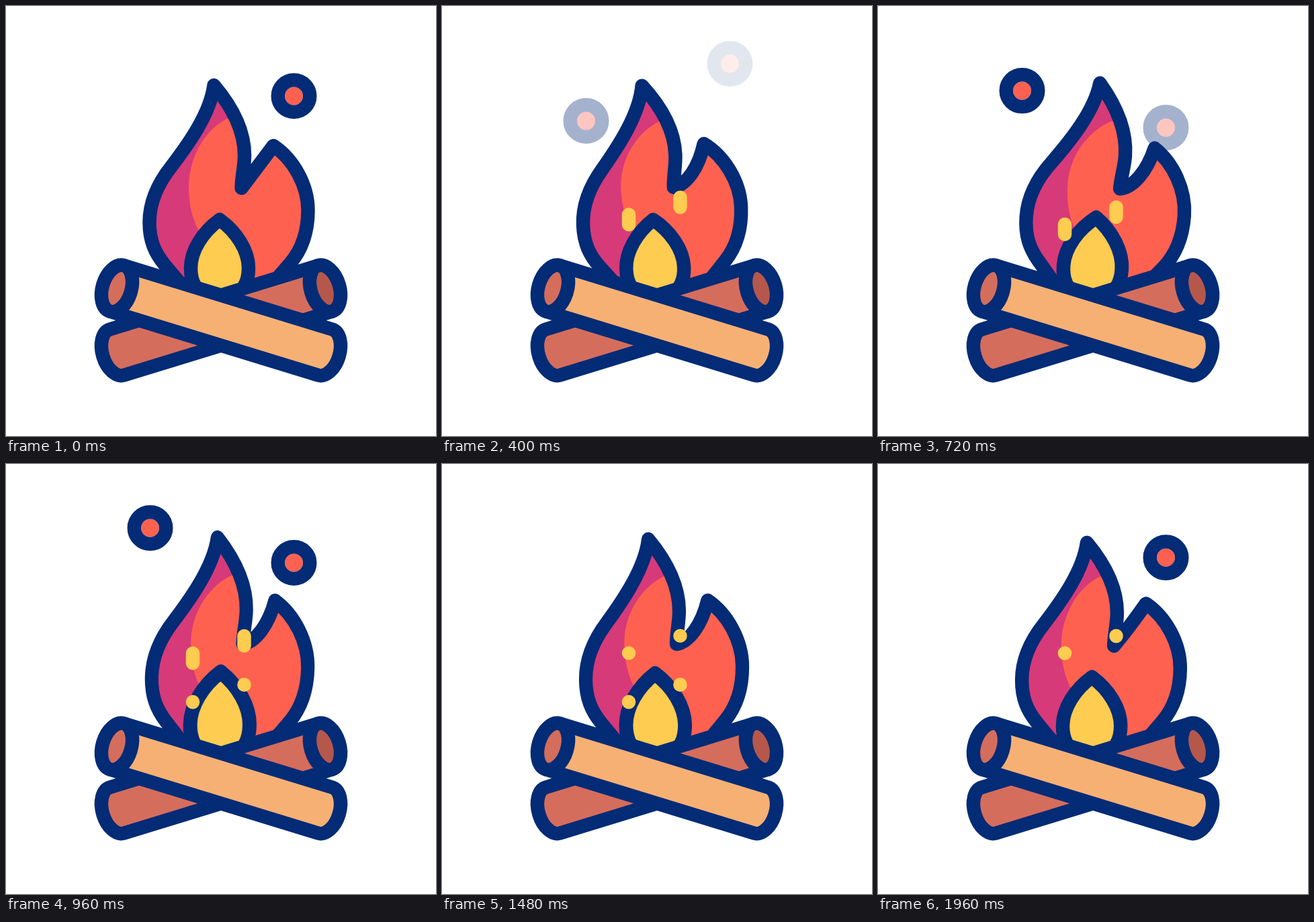
Recreate the animation shown at these times as an HTML page with a canvas. Size 640 by 640 pixels, loop 2000 ms.

```html
<!DOCTYPE html>
<html lang="en">
<head>
<meta charset="utf-8">
<title>Campfire</title>
<style>
  html, body { margin: 0; width: 100%; height: 100%; overflow: hidden; background: #fff; }
  canvas { display: block; width: 640px; height: 640px; }
</style>
</head>
<body>
<canvas id="stage" width="640" height="640"></canvas>
<script>
const ctx = document.getElementById('stage').getContext('2d');
const NAVY = '#032b76', ORANGE = '#ff6150', PURPLE = '#d73a78', YELLOW = '#fdcc50';
const WOOD = '#f6b074', DARK_WOOD = '#d56d5d', SHADE = '#b6574b';
const LINE = 20.5, STEP = 40, STEPS = 50;

const clamp = v => Math.max(0, Math.min(1, v));
const mix = (a, b, u) => a + (b - a) * u;
const smooth = u => u * u * (3 - 2 * u);

// Eased value from a table of [step, value].
function keyed(keys, f) {
  let i = 1;
  while (i < keys.length - 1 && f > keys[i][0]) i++;
  const [f0, v0] = keys[i - 1], [f1, v1] = keys[i];
  return mix(v0, v1, smooth(clamp((f - f0) / (f1 - f0))));
}

const SWAY = [[0, 0], [6.25, -1], [18.75, 1], [31.25, -1], [43.75, 1], [50, 0]];
const BEND = [[0, 0], [6.25, 1], [43.75, 1], [50, 0]];

function paint(path, fill) {
  ctx.fillStyle = fill;
  ctx.fill(path);
  ctx.stroke(path);
}

const flameBody = bend => new Path2D(`M309.5 118
  C334 147 355 183 355 222 C355 240 351 252 350.5 271
  C${mix(366.5, 370, bend)} ${mix(250, 268, bend)} ${mix(382.3, 389, bend)} ${mix(229, 243, bend)} 398 208
  C428 228 449.5 267 449.5 304 C449.5 338 440 363 423 383
  L398 412 L370 440 H285 L262 416 L236 385
  C222 368 213.5 350 213.5 322 C213.5 292 227 263 246 239
  C272 205 304 160 309.5 118Z`);

const flameGlow = bend => new Path2D(`M345 160
  L${331 + 2 * bend} ${167 + 5 * bend} C${300 + 3 * bend} ${180 + 5 * bend} 272 222 272 270
  C272 297 278 320 290 340 L320 460 H500 V100 H345Z`);

const core = new Path2D(`M318 318 C293 336 275 364 275 390 C275 401 277 409 281 416
  L300 445 H336 L355 416 C359 409 361 401 361 390 C361 364 343 336 318 318Z`);

function drawFlame(f) {
  const bend = keyed(BEND, f);
  const body = flameBody(bend);
  const pulse = Math.sin(Math.PI * f / 10) ** 2;
  const stretch = (x, y) => {
    ctx.scale(1 + x * pulse, 1 + y * pulse);
    ctx.translate(-320, -410);
  };
  ctx.save();
  ctx.translate(320, 410);
  ctx.rotate(0.0715 * keyed(SWAY, f));

  ctx.save();
  stretch(-0.018, 0.032);
  ctx.save();
  ctx.clip(body);
  ctx.fillStyle = PURPLE;
  ctx.fill(body);
  ctx.fillStyle = ORANGE;
  ctx.fill(flameGlow(bend));
  ctx.restore();
  ctx.stroke(body);
  ctx.restore();

  stretch(0.03, 0.1);
  paint(core, YELLOW);
  ctx.restore();
}

const LOG_X = 310, LOG_Y = 95, LOG_LENGTH = Math.hypot(LOG_X, LOG_Y);
const bark = new Path2D();
bark.moveTo(0, -35.7);
bark.ellipse(LOG_LENGTH, 0, 21.5, 35.7, 0, -Math.PI / 2, Math.PI / 2);
bark.lineTo(0, 35.7);
bark.closePath();
const cut = new Path2D();
cut.ellipse(0, 0, 21.5, 35.7, 0, 0, 2 * Math.PI);

function drawLog(side, fill, end) {
  ctx.save();
  ctx.translate(320, 420.4);
  ctx.scale(side, 1);
  ctx.translate(-LOG_X / 2, 0);
  ctx.rotate(Math.atan2(LOG_Y, LOG_X));
  paint(bark, fill);
  paint(cut, end);
  ctx.restore();
}

function drawEmber(x, base, age) {
  const alpha = Math.min(clamp(age * 0.36), clamp((19.28 - age) * 0.36));
  if (alpha <= 0) return;
  const y = base - 5.95 * age + 0.033 * age * age;
  ctx.save();
  ctx.globalAlpha = alpha;
  ctx.fillStyle = ORANGE;
  ctx.beginPath();
  ctx.arc(x, y, 13.5, 0, 2 * Math.PI);
  ctx.fill();
  ctx.beginPath();
  ctx.arc(x, y, 23.75, 0, 2 * Math.PI);
  ctx.stroke();
  ctx.restore();
}

function drawSpark(x, base, age) {
  if (age < 0 || age > 13.3) return;
  const head = base - 73 * clamp(age * 0.099);
  const tail = base - 73 * clamp(age * 0.099 - 0.2);
  ctx.beginPath();
  ctx.moveTo(x, tail);
  ctx.lineTo(x, head - 0.01);
  ctx.stroke();
}

function draw(f) {
  ctx.fillStyle = '#fff';
  ctx.fillRect(0, 0, 640, 640);
  ctx.lineWidth = LINE;
  ctx.lineCap = ctx.lineJoin = 'round';
  ctx.strokeStyle = NAVY;

  drawEmber(214.5, 177, f - 9);
  drawEmber(428.5, 187, f - 17);
  drawEmber(428.5, 187, ((f < 20 ? f + STEPS : f) - 40.2) * 0.958);
  drawFlame(f);
  drawLog(-1, DARK_WOOD, SHADE);
  drawLog(1, WOOD, DARK_WOOD);

  ctx.strokeStyle = YELLOW;
  for (const start of [3.93, 13.93, 23.93, 36.93]) {
    drawSpark(278, 354.5, f - start);
    drawSpark(354.5, 328.8, f - start);
  }
}

const begin = performance.now();
function tick() {
  const time = performance.now() - begin;
  draw(Math.floor(time / STEP + 0.05) % STEPS);
  requestAnimationFrame(tick);
}
tick();
</script>
</body>
</html>
```
